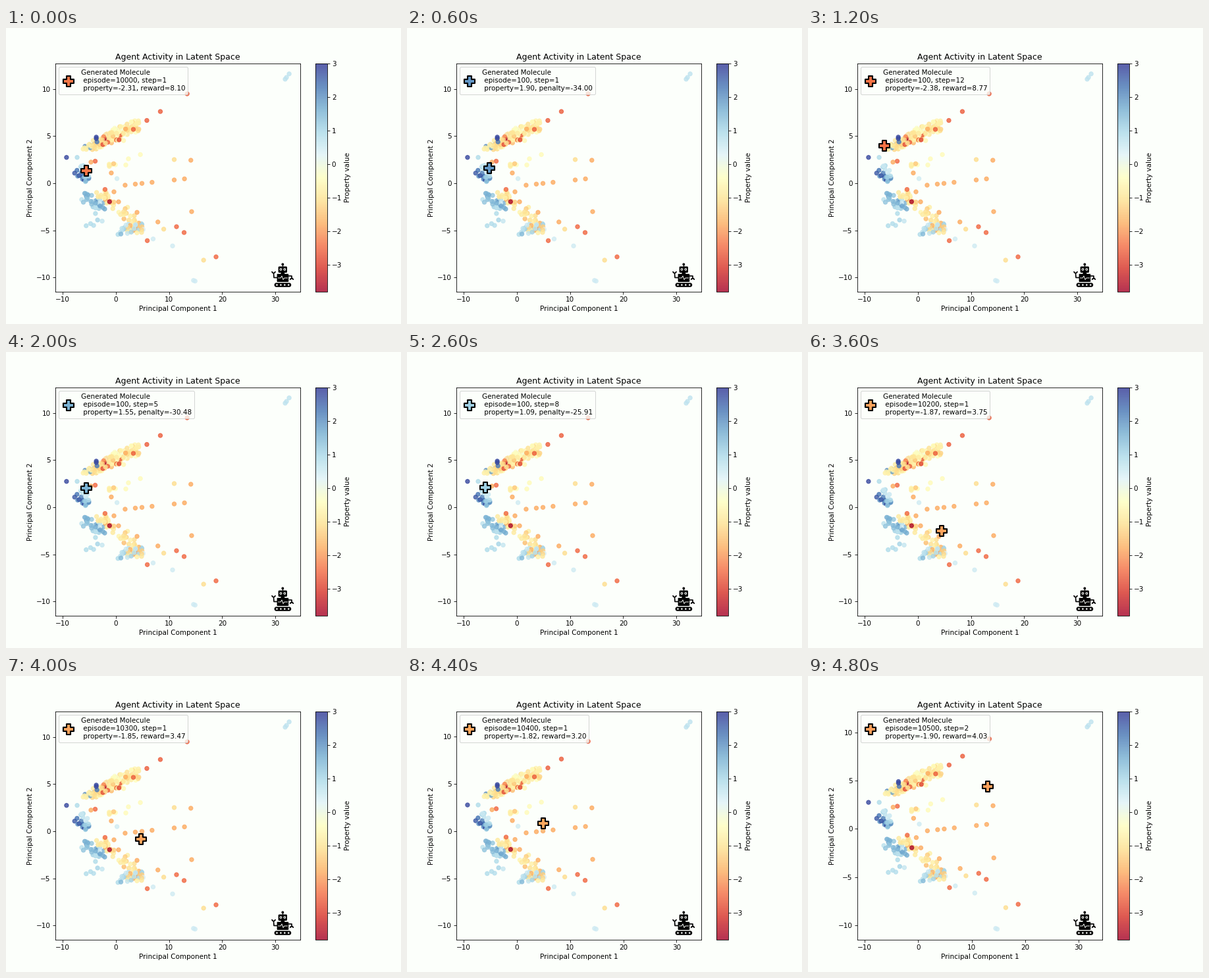
Recreate the animation shown at these times as a matplotlib script. Size 600x450 px, loop 5 s.

```python
import numpy as np
import matplotlib.pyplot as plt
from matplotlib.animation import FuncAnimation
from matplotlib.colors import Normalize
from matplotlib.patches import Arc, Circle, FancyBboxPatch

BG = "#fcfffb"
plt.rcParams.update({"font.family": "DejaVu Sans", "figure.facecolor": BG, "axes.facecolor": BG})
CMAP = plt.get_cmap("RdYlBu")
NORM = Normalize(-3.79, 3.0)

# Single molecules, grouped by property value.
SINGLES = {
    -3.7: [(-1.2, -1.95)],
    -2.5: [(-2.05, -.65), (-3.9, 2.35), (11.4, -4.6), (12.83, -5.22), (5.9, -6.08), (18.84, -7.8)],
    -1.8: [(14.1, 2.45), (-.87, 1.1), (-.37, -.9), (.5, -1.96), (14.25, -3), (3.97, -3.08),
           (7.9, -4.1), (-4.7, 2.25)],
    -1.1: [(10.97, 2.52), (9, -4.86), (16.5, -8.15)],
    -.5: [(4.6, 3.05), (2.35, 2.6), (1.86, 1.95)],
    .5: [(.2, .5), (7, -5.9), (10.66, -6.64), (14.6, -10.3), (14.9, -10.37)],
    .9: [(-7.3, 2.75), (-5.6, -4.5), (-3.85, -3.2)],
    2.8: [(-9.3, 2.75), (-3.7, 4.9), (-3.7, 4.75)],
}

# Molecules on straight lines: xs, slope, offset, property.
LINES = [
    ([1.73, 3.65, 4.9, 6.8, 10.97, 12.9], .06, -.3, -1.8),
    ([3.28, 5.82, 8.36, 13.4], .373, 4.5, -2.6),
    ([31.85, 32.1, 32.6], .75, -12.84, .7),
]

# Strips of molecules: start, end, spread, count, mean property.
STRIPS = [
    ((-5.7, 3.7), (4, 6.2), .35, 90, -.9),
    ((0, 5), (4.3, 6.3), .45, 22, -.5),
    ((-5, 3.9), (2, 5.3), .3, 14, -2),
    ((-6, 3.6), (-3, 4.6), .2, 7, 1.9),
    ((-6.7, 2), (-6, 1.8), .2, 5, .9),
    ((-1.6, 2), (.2, 1.9), .12, 6, -.7),
    ((-7.7, 1.1), (-5.2, .3), .2, 18, 2),
    ((-5.9, 1), (-4.2, .1), .25, 8, 1.1),
    ((-6.4, -1.4), (-1.8, -2.6), .3, 34, 1.4),
    ((-3.6, -1.2), (-.5, -1.5), .3, 12, -.7),
    ((-2.5, -1.5), (3.8, -4.2), .4, 34, -1),
    ((.8, -5.2), (5.3, -4.5), .35, 28, .8),
    ((2, -4.8), (5.5, -4.7), .3, 22, -1.3),
    ((-5.2, -4.2), (-2.4, -4), .2, 4, .9),
]

EPISODES = [(10000, 3), (100, 12), (10100, 3), (10200, 2), (10300, 2), (10400, 1), (10500, 2)]


def make_stops():
    """Stops follow the text order of their step numbers: 1, 10, 11, 12, 2, ..."""
    stops = []
    for episode, steps in EPISODES:
        for step in sorted(range(1, steps + 1), key=str):
            if episode == 100:
                at, keys = step, [1, 5, 8, 12]
                tracks = ([-5.2, -5.58, -5.95, -6.26], [1.6, 2, 2.1, 4], [1.9, 1.548, 1.091, -2.377])
            elif episode == 10000:
                at, keys = step, [1, 3]
                tracks = ([-5.58, -5.6], [1.33, 2.6], [-2.31, -2.352])
            else:
                at, keys = len(stops), [15, 18, 22, 24]
                tracks = ([3.2, 4.5, 5, 13.04], [-3.4, -2.47, .8, 4.36], [-1.752, -1.8746, -1.82, -1.903])
            stops.append((episode, step, *(np.interp(at, keys, track) for track in tracks)))
    return stops


def make_points():
    rng = np.random.default_rng(7)
    parts = []
    for start, end, spread, count, mean in STRIPS:
        along = rng.uniform(0, 1, (count, 1))
        xy = np.array(start) + along * np.subtract(end, start)
        xy = xy + rng.normal(0, 1, (count, 2)).clip(-1.7, 1.7) * spread
        parts.append(np.column_stack([xy, rng.normal(mean, .1 + .25 * abs(mean), count)]))
    singles = [(x, y, prop) for prop, places in SINGLES.items() for x, y in places]
    lined = [(x, slope * x + offset, prop) for xs, slope, offset, prop in LINES for x in xs]
    return np.vstack([rng.permutation(np.vstack(parts)), singles, lined])


def bend(points, amount):
    """The projection pulls in the far upper right slightly as it is refitted."""
    x, y = points.T
    right = np.maximum(x, 0)
    return np.column_stack([x - .008 * amount * right,
                            y - .0014 * amount * right * np.maximum(y, 0)])


def padded(values):
    margin = .05 * np.ptp(values)
    return values.min() - margin, values.max() + margin


def draw_robot(fig):
    ax = fig.add_axes([0, 0, 1, 1])
    ax.set(xlim=(0, 600), ylim=(450, 0))
    ax.axis("off")

    def box(x0, y0, x1, y1, r=1):
        ax.add_patch(FancyBboxPatch((x0 + r, y0 + r), x1 - x0 - 2 * r, y1 - y0 - 2 * r,
                                    boxstyle=f"round,pad={r}", fc="black", lw=0))

    def dot(x, y, r, color):
        ax.add_patch(Circle((x, y), r, fc=color, lw=0))

    def line(xs, ys, width, color="black"):
        ax.plot(xs, ys, color=color, lw=width)

    dot(420.3, 359.3, 1.9, "black")
    line([420.3, 420.3], [360, 363], 1.2)
    box(413.6, 362.5, 427, 372, 1.6)
    for x in (417.4, 423.3):
        dot(x, 367, 1.9, BG)
        dot(x, 367, .8, "black")
    box(417.5, 371, 423.2, 375, .3)
    box(411.6, 373.8, 429.2, 386, .8)
    line([413.5, 417, 419, 421, 423, 427.5], [380, 380, 377, 382.5, 380, 380], .9, BG)
    line([412, 407, 406.5], [379.5, 379.5, 373], 1.6)
    ax.add_patch(Arc((406.5, 370), 5, 5, theta1=0, theta2=180, lw=1.6))
    line([429, 434, 434], [377, 377, 380.5], 1.6)
    ax.add_patch(Arc((434, 383), 4.6, 5, theta1=180, theta2=360, lw=1.6))
    box(407.6, 387.4, 433.2, 393.8, 3)
    for k in range(4):
        dot(411.5 + 5.9 * k, 390.6, 1.3, BG)


def caption(episode, step, prop):
    reward = -10 * prop - 15
    kind = "reward" if reward >= 0 else "penalty"
    return (f"Generated Molecule\n episode={episode}, step={step}\n"
            f" property={prop:.2f}, {kind}={reward:.2f}")


points = make_points()
stops = make_stops()
fig, ax = plt.subplots(figsize=(8, 6), dpi=75)
cloud = ax.scatter(points[:, 0], points[:, 1], c=points[:, 2], cmap=CMAP, norm=NORM, alpha=.8)
agent = ax.scatter([0], [0], s=225, marker="P", color="C0", edgecolor="black",
                   linewidth=2, zorder=3, label="agent")
fig.colorbar(cloud, ax=ax, label="Property value")
ax.set(title="Agent Activity in Latent Space",
       xlabel="Principal Component 1", ylabel="Principal Component 2")
legend = ax.legend(handles=[agent], loc="upper left")
draw_robot(fig)


def update(i):
    episode, step, x, y, prop = stops[i]
    xy = bend(points[:, :2], np.interp(i, [21, 22, 23, 24], [0, .15, .6, 1]))
    cloud.set_offsets(xy)
    ax.set(xlim=padded(xy[:, 0]), ylim=padded(xy[:, 1]))
    agent.set_offsets([(x, y)])
    for marker in (agent, legend.legend_handles[0]):
        marker.set_facecolor(CMAP(NORM(prop)))
    legend.get_texts()[0].set_text(caption(episode, step, prop))
    return cloud, agent, legend


anim = FuncAnimation(fig, update, frames=len(stops), interval=200, repeat=True, repeat_delay=0)
plt.show()
```
